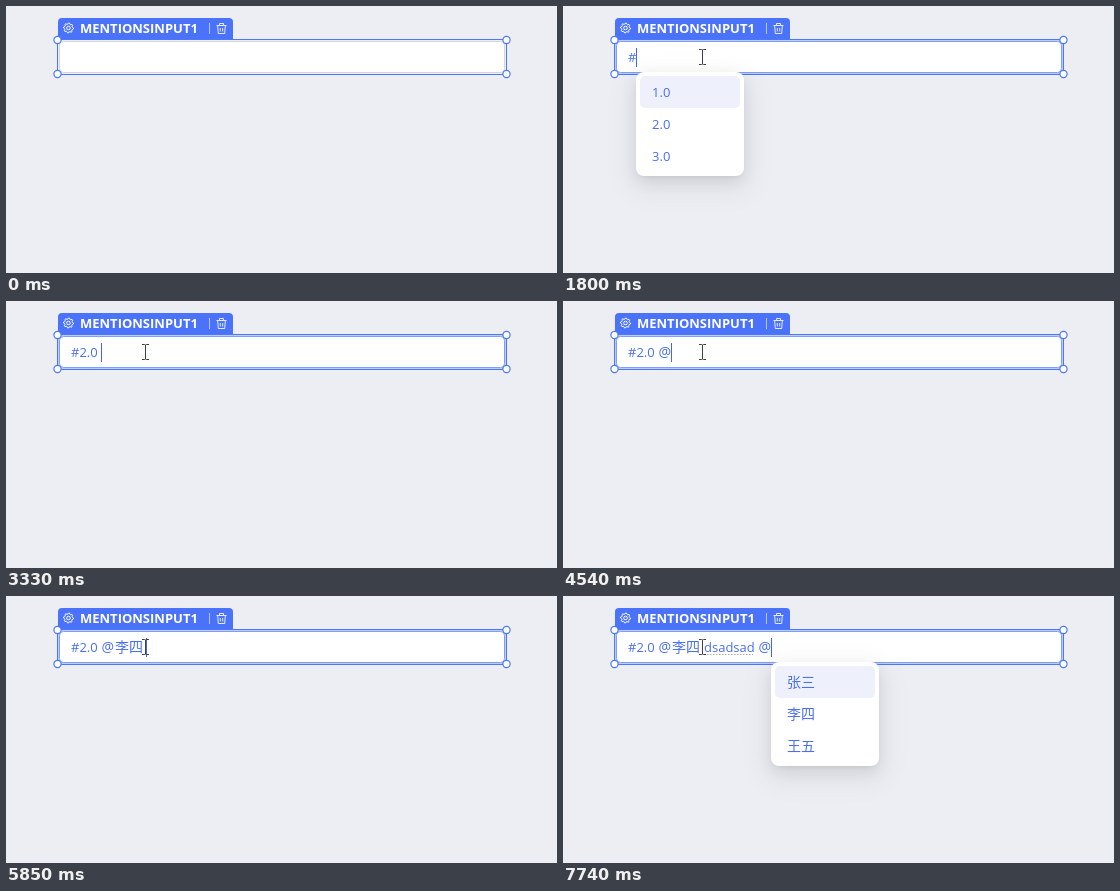
These frames come from a looping animation (551x267 px, 8 s). An HTML page:

```html
<!DOCTYPE html>
<html lang="zh-CN">
<head>
<meta charset="utf-8">
<style>
html, body { margin: 0; width: 100%; height: 100%; overflow: hidden; background: #edeef3; }
svg { position: absolute; left: 0; top: 0; }
svg, #menu { font: 13px "Open Sans", "Noto Sans", "Noto Sans CJK SC", "Noto Sans CJK", sans-serif; fill: #4a6ff0; color: #4a6ff0; }
.wide { font-size: 14px; }
#menu {
  position: absolute; top: 66px; width: 100px; height: 96px; padding: 4px; border-radius: 8px; background: #fff;
  box-shadow: 0 6px 16px rgba(0,0,0,.08), 0 3px 6px -4px rgba(0,0,0,.12), 0 9px 28px 8px rgba(0,0,0,.05);
}
#menu div { height: 32px; line-height: 32px; padding-left: 12px; border-radius: 5px; }
</style>
</head>
<body>
<svg width="551" height="267" viewBox="0 0 551 267">
  <path d="M52 33V16a4 4 0 0 1 4-4H223a4 4 0 0 1 4 4V33z" fill="#4a72fb"/>
  <text x="74" y="27" font-weight="700" fill="#fff">MENTIONSINPUT1</text>
  <g fill="none" stroke="#fff" stroke-width="1">
    <path id="gear"/>
    <circle cx="62.5" cy="22" r="1.8"/>
    <path d="M203.5 17V28" opacity=".6"/>
    <path d="M210.5 19.5H220.5M213.5 19V17.5H217.5V19M211.7 20L212.3 27.5H218.7L219.3 20M214.3 22V25.5M216.7 22V25.5" opacity=".85"/>
  </g>
  <rect id="glow" x="51.5" y="33.5" width="449" height="35" rx="5" fill="#bccdfc"/>
  <rect id="box" x="53.5" y="35.5" width="445" height="31" rx="4" fill="#fff"/>
  <rect x="51.5" y="33.5" width="449" height="35" fill="none" stroke="#4a78f8"/>
  <g id="knobs" fill="#fff" stroke="#4a78f8" stroke-width="1.2"></g>
  <text id="line" y="56" xml:space="preserve"></text>
  <path id="spell" d="M141 58.5H190" stroke="#a5a9b5" stroke-dasharray="1.5 1.5"/>
  <rect id="caret" y="42" width="1" height="19" fill="#4168e8"/>
</svg>
<div id="menu"></div>
<svg width="551" height="267" viewBox="0 0 551 267">
  <path id="beam" d="M-3.5-7.5H-1Q0-7.5 0-6.5Q0-7.5 1-7.5H3.5M0-7V7M-3.5 7.5H-1Q0 7.5 0 6.5Q0 7.5 1 7.5H3.5" fill="none" stroke="#3c4048"/>
  <path id="arrow" d="M0 0V14L3.3 11L5.5 16L7.7 15L5.5 10.2H10z" fill="#fff" stroke="#222" stroke-width=".9"/>
</svg>
<script>
const $ = id => document.getElementById(id);
const LOOP = 8000;
const numbers = ['1.0', '2.0', '3.0'], people = ['张三', '李四', '王五'];
const runX = [65, 95.5, 109, 141, 195.5];
const typed = '#2.0|@|李四';

// [time, text runs, caret x, menu x, highlight row]; 0 hides caret or menu
const states = [
  [0, '', 0],
  [710, '', 65],
  [1210, '', 0],
  [1710, '#', 73],
  [1800, '#', 73, 73, 0],
  [2210, '#', 0, 73, 0],
  [2830, '#', 73, 73, 0],
  [3020, '#', 73, 73, .5],
  [3110, '#', 73, 73, 1],
  [3330, '#2.0', 95],
  [3830, '#2.0', 0],
  [4330, '#2.0', 95],
  [4540, '#2.0|@', 108],
  [4630, '#2.0|@', 108, 108, 0],
  [5040, '#2.0|@', 0, 108, 0],
  [5440, '#2.0|@', 108, 108, .5],
  [5540, '#2.0|@', 108, 108, 1],
  [5850, typed, 140],
  [6350, typed + '|d', 149],
  [6450, typed + '|ds', 155],
  [6550, typed + '|dsa', 162],
  [6650, typed + '|dsads', 176],
  [6740, typed + '|dsadsad', 191],
  [6840, typed + '|dsadsad', 195],
  [7340, typed + '|dsadsad', 0],
  [7740, typed + '|dsadsad|@', 208, 208, 0]
];

// Static parts
let gear = '';
for (let i = 0; i < 32; i++) {
  const a = i * Math.PI / 16, r = i % 4 < 2 ? 5 : 3.9;
  gear += (i ? 'L' : 'M') + (62.5 + r * Math.cos(a)) + ' ' + (22 + r * Math.sin(a));
}
$('gear').setAttribute('d', gear + 'z');
for (const x of [51.5, 500.5]) for (const y of [34, 68])
  $('knobs').innerHTML += `<circle cx="${x}" cy="${y}" r="3.6"/>`;

const show = (id, on) => $(id).style.display = on ? '' : 'none';
const run = (s, i) => `<tspan x="${runX[i]}"${/[@李]/.test(s) ? ' class="wide"' : ''}>${s}</tspan>`;

function drawPointer(t) {
  const step = Math.min(5, Math.floor((t - 220) / 98));
  const left = (1 - step / 5) ** 2;
  const x = 139 + 24 * left, y = 51 + 76 * left, inside = y < 68;
  show('beam', t >= 220 && inside);
  show('arrow', t >= 220 && !inside);
  $(inside ? 'beam' : 'arrow').setAttribute('transform', `translate(${x + .5} ${y})`);
  return inside;
}

let last;
function frame(now) {
  const t = now % LOOP;
  const hover = drawPointer(t) && t >= 220;
  $('glow').style.opacity = t < 710 ? 0 : t < 810 ? .5 : 1;
  $('box').setAttribute('stroke', t >= 710 || hover ? '#7f9efa' : '#d3d6df');

  const state = states.findLast(s => s[0] <= t);
  if (state !== last) {
    last = state;
    const [time, text, caret, menu, row] = state;
    $('line').innerHTML = text && text.split('|').map(run).join('');
    show('caret', caret);
    $('caret').setAttribute('x', caret);
    show('spell', time >= 6840);
    show('menu', menu);
    if (menu) {
      $('menu').style.left = menu + 'px';
      $('menu').innerHTML = (menu === 73 ? numbers : people).map((s, i) =>
        `<div class="${menu === 73 ? '' : 'wide'}" style="background:rgba(238,241,251,${Math.max(0, 1 - Math.abs(i - row))})">${s}</div>`).join('');
    }
  }
  requestAnimationFrame(frame);
}
const start = performance.now();
const tick = frame;
frame = () => tick(performance.now() - start);
frame();
</script>
</body>
</html>
```
